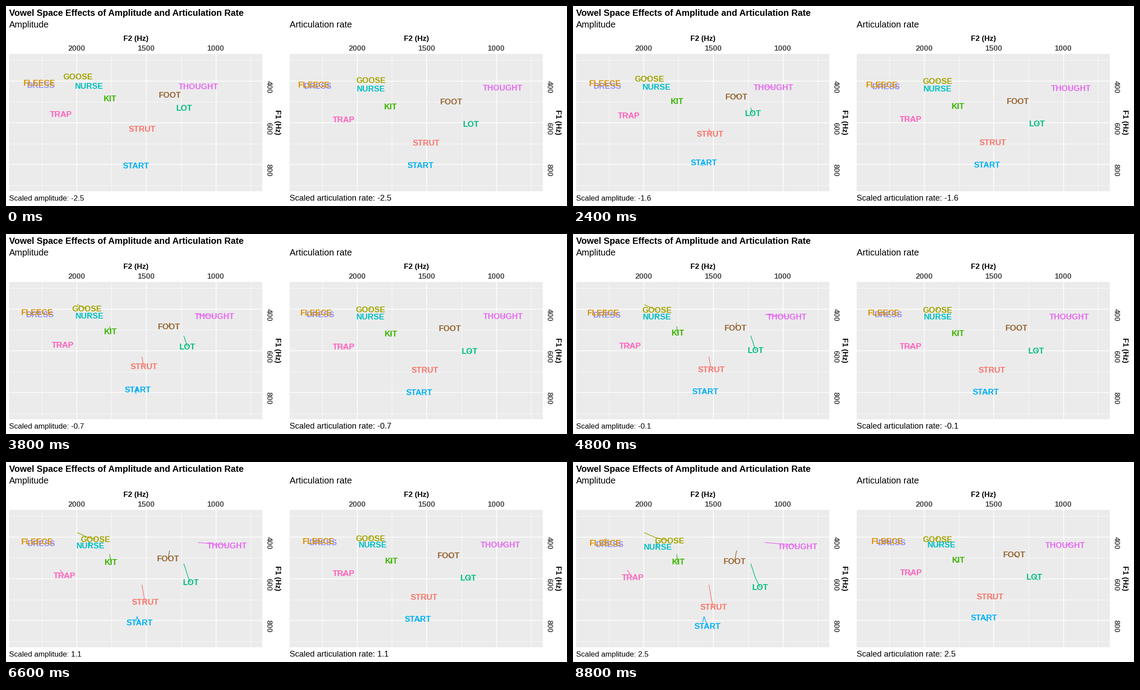
Animation, 1252 px wide and 447 px high, one loop 10000 ms. Source, as a matplotlib script:

```python
import numpy as np
import matplotlib.pyplot as plt
from matplotlib.animation import FuncAnimation
from matplotlib.patches import Rectangle

W, H, DPI = 1252, 447, 128
FRAMES, INTERVAL = 50, 200
HOLD, STEPS = 5, 39          # still frames at the start, then steps of motion
PX = 72 / DPI                # points per pixel
PANEL_SHIFT = 626
X_GAP, Y_GAP = 155.5, 93.2   # between major grid lines

plt.rcParams["font.family"] = "Liberation Sans"

fig = plt.figure(figsize=(W / DPI, H / DPI), dpi=DPI, facecolor="white")
ax = fig.add_axes([0, 0, 1, 1])
ax.set_xlim(0, W)
ax.set_ylim(H, 0)
ax.axis("off")


def label(x, y, text, size, **style):
    style = {"ha": "left", "va": "baseline", "color": "black", **style}
    return ax.text(x, y, text, fontsize=size * PX, **style)


def draw_panel(dx, subtitle, caption_size):
    left, right, top, bottom = dx + 7, dx + 572, 107, 414
    ax.add_patch(Rectangle((left, top), right - left, bottom - top,
                           fc="#EBEBEB", ec="none", zorder=0))
    x_major = dx + 157.5 + X_GAP * np.arange(3)
    y_major = 168 + Y_GAP * np.arange(3)
    x_minor = dx + 79.7 + X_GAP * np.arange(4)
    y_minor = 121.2 + Y_GAP * np.arange(4)
    for xs, ys, width in ((x_minor, y_minor, 0.8), (x_major, y_major, 1.6)):
        grid = dict(colors="white", linewidths=width * PX, zorder=1)
        ax.vlines(xs, top, bottom, **grid)
        ax.hlines(ys, left, right, **grid)

    tick = dict(weight="bold", color="#4D4D4D")
    side = dict(rotation=270, rotation_mode="anchor")
    for i, (x, y) in enumerate(zip(x_major, y_major)):
        label(x, 100.5, f"{2000 - 500 * i}", 17.2, ha="center", **tick)
        label(dx + 581.5, y - 1, f"{400 + 200 * i}", 16.8, **tick, **side)
    label(dx + 289.7, 78, "F2 (Hz)", 16.8, ha="center", weight="bold")
    label(dx + 601, 260, "F1 (Hz)", 16.8, ha="center", weight="bold", **side)
    label(left, 48.5, subtitle, 20)
    return label(left, 435, "", caption_size)


def path(start, shift, elbow=None):
    """Even motion from start by shift, bent at an optional (step, x, y)."""
    keys = [(0, *start), (STEPS, start[0] + shift[0], start[1] + shift[1])]
    if elbow:
        keys.insert(1, elbow)
    at, xs, ys = zip(*keys)
    steps = np.arange(STEPS + 1)
    return np.interp(steps, at, xs), np.interp(steps, at, ys)


words = []


def add_word(name, color, *paths):
    for xs, ys in paths:
        trail, = ax.plot([], [], color=color, lw=1.45 * PX, zorder=2)
        text = label(0, 0, name, 18, ha="center", weight="bold",
                     color=color, zorder=3)
        words.append((xs, ys, trail, text))


# Each word takes one path in the amplitude panel and one in the rate panel
add_word("DRESS", "#9590FF",
         path((77.5, 177), (3.5, 7), (15, 75, 179.5)),
         path((696, 179), (16, 1)))
add_word("FLEECE", "#D89000",
         path((74, 171.5), (-2.5, 9), (18, 67, 175.5)),
         path((686.5, 175.5), (14, 1)))
add_word("FOOT", "#996633",
         path((365, 198.5), (-4.5, 23.5)),
         path((993.5, 213.5), (-9, -7)))
add_word("GOOSE", "#A3A500",
         path((159.5, 158), (55, 18), (17, 184, 169)),
         path((813.5, 166), (-1, 7)))
add_word("KIT", "#39B600",
         path((231.5, 207), (3.5, 15.5), (24, 234, 224.5)),
         path((858, 224.5), (2, -6)))
add_word("LOT", "#00BF7D",
         path((397, 228), (20.5, 51.5), (19, 407.5, 260)),
         path((1037, 264), (-8, -7.5)))
add_word("NURSE", "#00BFC4",
         path((185, 179), (4, 11)),
         path((814, 184.5), (7.5, 0.5), (14, 812.5, 185)))
add_word("START", "#00B0F6",
         path((289.5, 357), (10.5, 9.5), (11, 292.5, 345.5)),
         path((925, 356), (-8.5, -8)))
add_word("STRUT", "#F8766D",
         path((303.5, 275), (9.5, 49), (19, 308.2, 303)),
         path((937, 306), (-6.5, -5.5)))
add_word("THOUGHT", "#E76BF3",
         path((429, 180), (72, 9), (24, 490, 185.5)),
         path((1107.5, 183), (-10, 3), (9, 1111.5, 183.5)))
add_word("TRAP", "#FF62BC",
         path((121.5, 242), (11.5, 16)),
         path((752.5, 254), (1, -7.5)))

label(7, 21.5, "Vowel Space Effects of Amplitude and Articulation Rate", 19.9,
      weight="bold")
captions = {
    "amplitude": draw_panel(0, "Amplitude", 16.7),
    "articulation rate": draw_panel(PANEL_SHIFT, "Articulation rate", 18.3),
}


def update(frame):
    step = min(max(frame - HOLD, 0), STEPS)
    value = -2.5 + 5 * step / STEPS
    for measure, caption in captions.items():
        caption.set_text(f"Scaled {measure}: {value:.1f}")
    for xs, ys, trail, text in words:
        trail.set_data(xs[:step + 1], ys[:step + 1])
        text.set_position((xs[step] + 0.5, ys[step] + 6.4))
    return []


anim = FuncAnimation(fig, update, frames=FRAMES, interval=INTERVAL,
                     init_func=lambda: update(0), repeat=True, repeat_delay=0)
plt.show()
```
